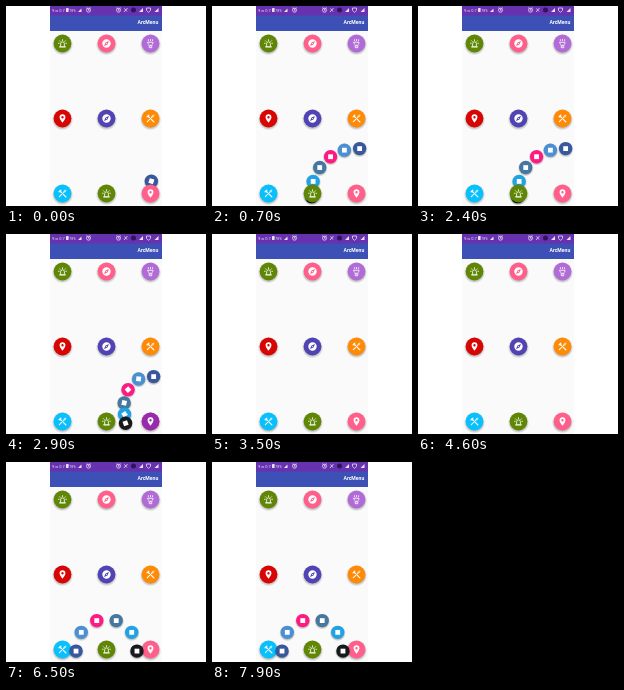
Recreate the animation shown at these times as an HTML page. Size 200x200 px, loop 8 s.

```html
<!DOCTYPE html>
<html lang="en">
<head>
<meta charset="utf-8">
<title>Arc menu</title>
<style>
  html, body { margin: 0; width: 100%; height: 100%; overflow: hidden; background: #fff; }
  svg { display: block; width: 100vw; height: 100vh; }
  text { font-family: Roboto, "Open Sans", sans-serif; fill: #fff; }
</style>
</head>
<body>
<svg id="stage" viewBox="0 0 200 200">
  <defs>
    <radialGradient id="shade">
      <stop offset=".72" stop-color="#000" stop-opacity=".28"/>
      <stop offset="1" stop-color="#000" stop-opacity="0"/>
    </radialGradient>
    <clipPath id="screen"><rect x="44" width="112" height="200"/></clipPath>
    <g id="siren" fill="none" stroke="#fff" stroke-width="2" stroke-linecap="round">
      <path d="M7.5 18V12.5a4.5 4.5 0 0 1 9 0V18M12 3v2M5 5.5l1.5 1.5M19 5.5l-1.5 1.5M2.5 11.5h1.5M20 11.5h1.5"/>
      <path d="M5.5 20H18.5" stroke-width="3"/>
    </g>
    <g id="compass" fill="#fff">
      <path fill-rule="evenodd" d="M12 2a10 10 0 1 1 0 20a10 10 0 1 1 0-20ZM18 6L14.2 14.2L6 18L9.8 9.8Z"/>
      <circle cx="12" cy="12" r="1.3"/>
    </g>
    <g id="torch" fill="none" stroke="#fff" stroke-width="2" stroke-linecap="round">
      <path d="M6 9H18V12L15 15V22H9V15L6 12ZM12 16v2M12 2.5v2.5M7 3v2M17 3v2"/>
    </g>
    <path id="pin" fill="#fff" fill-rule="evenodd"
      d="M12 2a7 7 0 0 0-7 7c0 5 7 13 7 13s7-8 7-13a7 7 0 0 0-7-7ZM12 6.2a2.8 2.8 0 1 1 0 5.6a2.8 2.8 0 1 1 0-5.6Z"/>
    <g id="tools" fill="none" stroke="#fff" stroke-linecap="round">
      <path d="M14 14L20 20" stroke-width="3"/>
      <path d="M4 8L8 4M6.5 6.5L9.5 9.5" stroke-width="3"/>
      <path d="M4.5 19.5L15 9" stroke-width="2.4"/>
      <path d="M19 4L16 5.5L15.5 8.5L18.5 8L20 5" stroke-width="1.8"/>
    </g>
    <g id="alarm" fill="none" stroke="#fff" stroke-width=".8">
      <path d="M0-1.5V.1H1.1M-2.3-2L-1.2-2.9M2.3-2L1.2-2.9"/>
      <circle r="2"/>
    </g>
  </defs>
  <g clip-path="url(#screen)">
    <rect x="44" width="112" height="200" fill="#fafafa"/>
    <rect x="44" y="9" width="112" height="16" fill="#3c50b5"/>
    <rect x="44" width="112" height="9.5" fill="#6731b0"/>
    <text x="152.3" y="18.4" font-size="5.1" font-weight="700" text-anchor="end">ArcMenu</text>
    <g opacity=".85">
      <text x="46" y="6.2" font-size="4">9.w 0.7</text>
      <rect x="60" y="2" width="2.6" height="4" rx=".4" fill="#fff"/>
      <text x="63.2" y="5.8" font-size="3.6">78%</text>
      <path d="M72 6H75.5V2.5Z" fill="#fff"/>
      <use href="#alarm" x="82.5" y="4.2"/>
      <use href="#alarm" x="112.5" y="4.2"/>
      <g fill="none" stroke="#fff" stroke-width=".8">
        <path d="M118 6L121.5 2M118.5 2.5L121 5.5"/>
        <path d="M140.5 2H144.5V4.4L142.5 6.4L140.5 4.4Z"/>
      </g>
      <circle cx="127.5" cy="4" r="2.5" fill="#24104e"/>
      <path d="M133 6H137V2ZM148.5 6H152.5V2Z" fill="#fff"/>
    </g>
    <g id="menus"></g>
  </g>
</svg>
<script>
const NS = "http://www.w3.org/2000/svg";
const LOOP = 8000, STEP = 100, SPAN = 300;
const ITEM_COLORS = ["#39579c", "#4a90d2", "#ff1a82", "#46779f", "#1fa3e4", "#17191d"];
const COUNT = ITEM_COLORS.length;

// Arc angles are measured clockwise from straight up.
const MENUS = [
  { x: 144.5, y: 187.5, radius: 45, from: 4, to: -94, open: -20, close: 2650,
    icon: "pin", color: "#ff5f8a", press: "#982aae" },
  { x: 100.5, y: 187.5, radius: 30.5, from: -93, to: 93, open: 5443, close: Infinity,
    icon: "siren", color: "#5f8705", press: "#34495c" }
];
const BUTTONS = [
  ["siren", "#5f8705"], ["compass", "#ff5f8a"], ["torch", "#b16bd6"],
  ["pin", "#d80505"], ["compass", "#5044b4"], ["tools", "#ff8a05"],
  ["tools", "#08c0fc"]
];

const clamp = v => Math.max(0, Math.min(1, v));
const overshoot = t => (t - 1) ** 2 * (2.5 * (t - 1) + 1.5) + 1;

function add(parent, tag, attrs) {
  const el = document.createElementNS(NS, tag);
  for (const key in attrs) el.setAttribute(key, attrs[key]);
  return parent.appendChild(el);
}

function disc(parent, r, fill) {
  add(parent, "circle", { cy: r * 0.13, r: r * 1.2, fill: "url(#shade)" });
  add(parent, "circle", { r, fill });
}

const layer = document.getElementById("menus");

function addButton(x, y, icon, color, press) {
  const g = add(layer, "g", { transform: `translate(${x} ${y})` });
  disc(g, 8.9, color);
  const ripple = press && add(g, "circle", { r: 0, fill: press });
  add(g, "use", { href: "#" + icon, transform: "scale(.42) translate(-12 -12)" });
  return ripple;
}

BUTTONS.forEach(([icon, color], i) =>
  addButton(56.5 + 44 * (i % 3), 37.5 + 75 * Math.floor(i / 3), icon, color));

for (const menu of MENUS) {
  menu.items = ITEM_COLORS.map(color => {
    const g = add(layer, "g", {});
    disc(g, 6.7, color);
    const mark = add(g, "rect", { x: -2.4, y: -2.4, width: 4.8, height: 4.8, fill: "#fff" });
    return { g, mark };
  });
  menu.ripple = addButton(menu.x, menu.y, menu.icon, menu.color, menu.press);
}

function openPose(i, t) {
  const delay = overshoot(i / COUNT) * 0.6;
  const reach = overshoot(clamp(t / SPAN - delay));
  return { reach, turn: 720 * reach };
}

// Waits for the first half, then accelerates home while turning.
function closePose(i, t) {
  const delay = ((COUNT - 1 - i) / COUNT) ** 2 * 0.6;
  const back = clamp((t / SPAN - delay) * 2 - 1) ** 2;
  return { reach: 1 - back, turn: 360 * back };
}

function drawRipple(menu, t) {
  const since = t >= menu.close ? t - menu.close : t - menu.open;
  const active = since > 30 && since < 550;
  menu.ripple.setAttribute("r", active ? 8.9 * clamp((since - 30) / 150) : 0);
  menu.ripple.setAttribute("opacity", 1 - clamp((since - 300) / 250));
}

function draw(t) {
  for (const menu of MENUS) {
    menu.items.forEach(({ g, mark }, i) => {
      const pose = t >= menu.close ? closePose(i, t - menu.close) : openPose(i, t - menu.open);
      const angle = (menu.from + (menu.to - menu.from) * i / (COUNT - 1)) * Math.PI / 180;
      const r = menu.radius * pose.reach;
      g.setAttribute("transform",
        `translate(${menu.x + r * Math.sin(angle)} ${menu.y - r * Math.cos(angle)})`);
      g.setAttribute("visibility", pose.reach > 0.01 ? "visible" : "hidden");
      mark.setAttribute("transform", `rotate(${pose.turn})`);
    });
    drawRipple(menu, t);
  }
}

const start = performance.now();
function tick() {
  const t = (performance.now() - start) % LOOP;
  draw(Math.floor(t / STEP) * STEP);
  requestAnimationFrame(tick);
}
tick();
</script>
</body>
</html>
```
